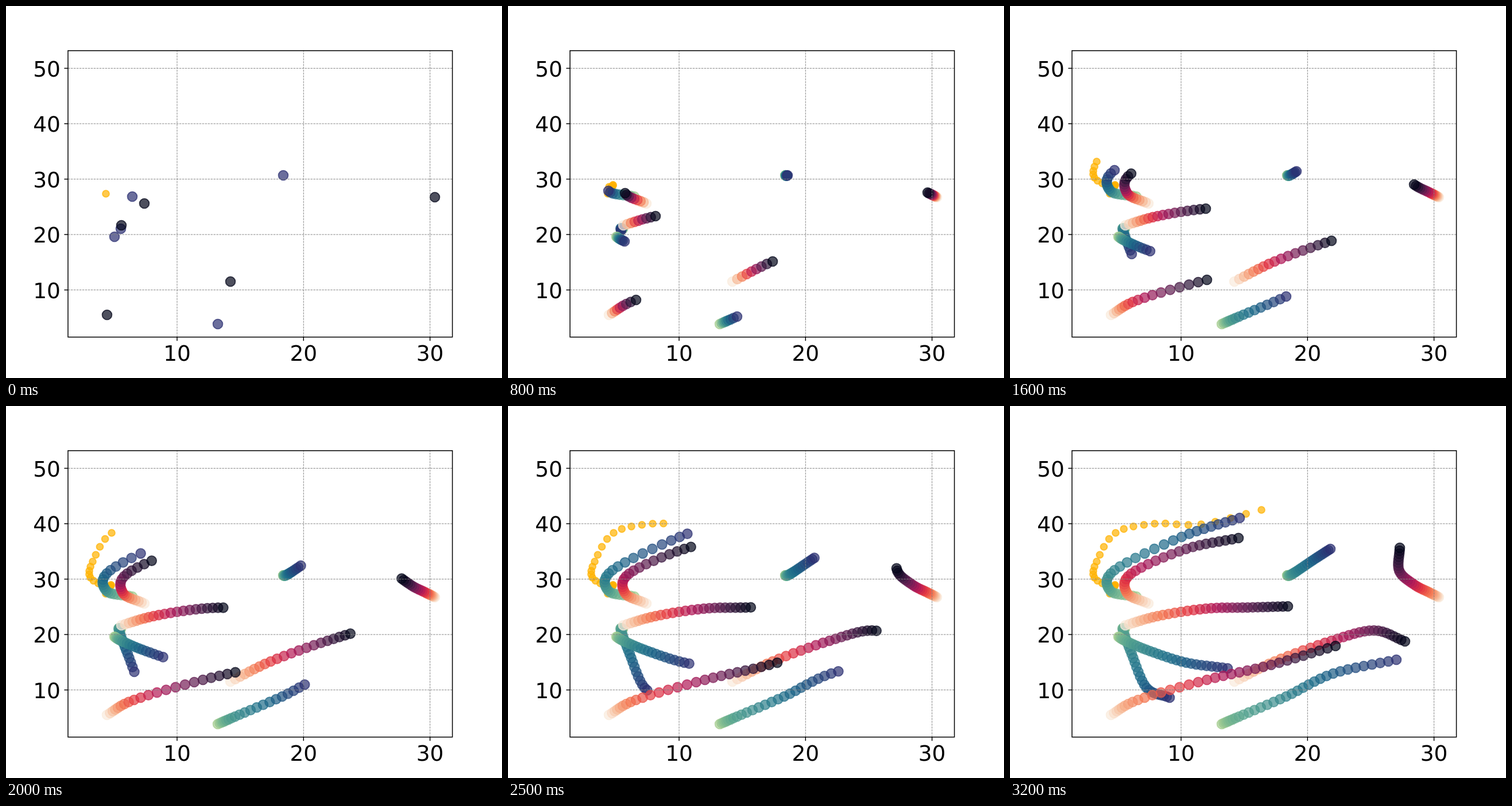
An HTML page with a canvas for the animation above (3300 ms loop, 864 by 648 pixels).

```html
<!DOCTYPE html>
<html lang="en">
<head>
<meta charset="utf-8">
<title>Movement trails</title>
<style>
  html, body { margin: 0; width: 100%; height: 100%; overflow: hidden; background: #fff; }
  canvas, svg { position: absolute; left: 0; top: 0; width: 864px; height: 648px; }
  text { font: 37.5px "DejaVu Sans", sans-serif; }
  .grid { stroke: #808080; stroke-width: .94; stroke-dasharray: 3.47 1.5; }
  .axis { stroke: #000; stroke-width: 1.5; fill: none; }
</style>
</head>
<body>
<canvas id="trails" width="864" height="648"></canvas>
<svg id="axes" viewBox="0 0 864 648"></svg>
<script>
const STEPS = 33, STEP_MS = 100;
const PT = 135 / 72; // pixels per point
const LEFT = 108, RIGHT = 777.6, TOP = 77.8, BOTTOM = 576.7, TICK = 3.5 * PT;

// Axes
const line = (cls, x1, y1, x2, y2) =>
  `<line class="${cls}" x1="${x1}" y1="${y1}" x2="${x2}" y2="${y2}"/>`;
const label = (value, x, y, anchor) =>
  `<text x="${x}" y="${y}" text-anchor="${anchor}">${value}</text>`;

let axes = '';
for (let v = 10; v <= 30; v += 10) {
  const x = 298 + (v - 10) * 22.03;
  axes += line('grid', x, BOTTOM, x, TOP) + line('axis', x, BOTTOM, x, BOTTOM + TICK)
        + label(v, x, BOTTOM + 2 * TICK + 28.5, 'middle');
}
for (let v = 10; v <= 50; v += 10) {
  const y = 494.6 - (v - 10) * 9.652;
  axes += line('grid', LEFT, y, RIGHT, y) + line('axis', LEFT - TICK, y, LEFT, y)
        + label(v, LEFT - 2 * TICK, y + 14.4, 'end');
}
axes += `<rect class="axis" x="${LEFT}" y="${TOP}" width="${RIGHT - LEFT}" height="${BOTTOM - TOP}"/>`;
document.getElementById('axes').innerHTML = axes;

// Colour ramps, from the oldest point to the newest
const ramp = hexes => {
  const stops = hexes.split(' ').map(h => [0, 2, 4].map(i => parseInt(h.substr(i, 2), 16)));
  return u => {
    const p = u * (stops.length - 1), i = Math.min(Math.floor(p), stops.length - 2);
    return `rgb(${stops[i].map((c, j) => Math.round(c + (stops[i + 1][j] - c) * (p - i)))})`;
  };
};
const cool = ramp('a5cd90 7dba91 59a590 40908e 287a8c 1c6488 254b7f 2c3172');
const warm = ramp('faebdd f6b48f f37651 e13342 ad1759 701f57 35193e 03051a');
const gold = () => '#ffb200';

// Catmull-Rom curve through evenly timed "x,y" knots, sampled once per step
function sample(path) {
  const knots = path.split(' ').map(p => p.split(',').map(Number));
  const last = knots.length - 1;
  const mirror = (a, b) => a.map((v, c) => 2 * v - b[c]);
  const at = i => i < 0 ? mirror(knots[0], knots[1])
    : i > last ? mirror(knots[last], knots[last - 1]) : knots[i];
  return Array.from({ length: STEPS }, (_, k) => {
    const p = k / (STEPS - 1) * last, i = Math.min(Math.floor(p), last - 1), t = p - i;
    return [0, 1].map(c => {
      const [a, b, d, e] = [-1, 0, 1, 2].map(o => at(i + o)[c]);
      return b + t / 2 * (d - a + t * (2 * a - 5 * b + 4 * d - e + t * (3 * (b - d) + e - a)));
    });
  });
}

// Marker area is in square points
const track = (color, area, path) =>
  ({ color, radius: Math.sqrt(area) / 2 * PT, points: sample(path) });

const tracks = [
  track(gold, 40, '174,327 183,312 176,315 147,299 151,271 184,221 252,205 333,206 438,181'),
  ...[
    '483,295 487,295 499,288 530,267 558,249',
    '369,554 399,541 481,506 563,466 673,442',
    '220,332 175,322 182,286 299,228 400,195',
    '200,388 197,391 212,432 238,491 278,508',
    '189,402 203,410 244,427 307,447 379,457',
  ].map(path => track(cool, 80, path)),
  ...[
    '747,333 731,325 704,311 678,287 679,247',
    '241,344 204,326 211,292 307,249 398,230',
    '201,382 257,366 341,353 414,351 484,349',
    '391,480 461,445 560,409 634,391 688,410',
    '176,538 223,512 343,477 455,451 567,418',
  ].map(path => track(warm, 80, path)),
];

const ctx = document.getElementById('trails').getContext('2d');
ctx.globalAlpha = 0.7;
ctx.lineWidth = PT;

function draw(head) {
  ctx.clearRect(0, 0, 864, 648);
  for (const { color, radius, points } of tracks) {
    for (let i = 0; i <= head; i++) {
      ctx.fillStyle = ctx.strokeStyle = color(head ? i / head : 1);
      ctx.beginPath();
      ctx.arc(...points[i], radius, 0, 2 * Math.PI);
      ctx.fill();
      ctx.stroke();
    }
  }
}

const start = performance.now();
let shown = 0;
function tick() {
  const head = Math.floor((performance.now() - start) / STEP_MS) % STEPS;
  if (head !== shown) draw(shown = head);
  requestAnimationFrame(tick);
}
draw(0);
requestAnimationFrame(tick);
</script>
</body>
</html>
```
